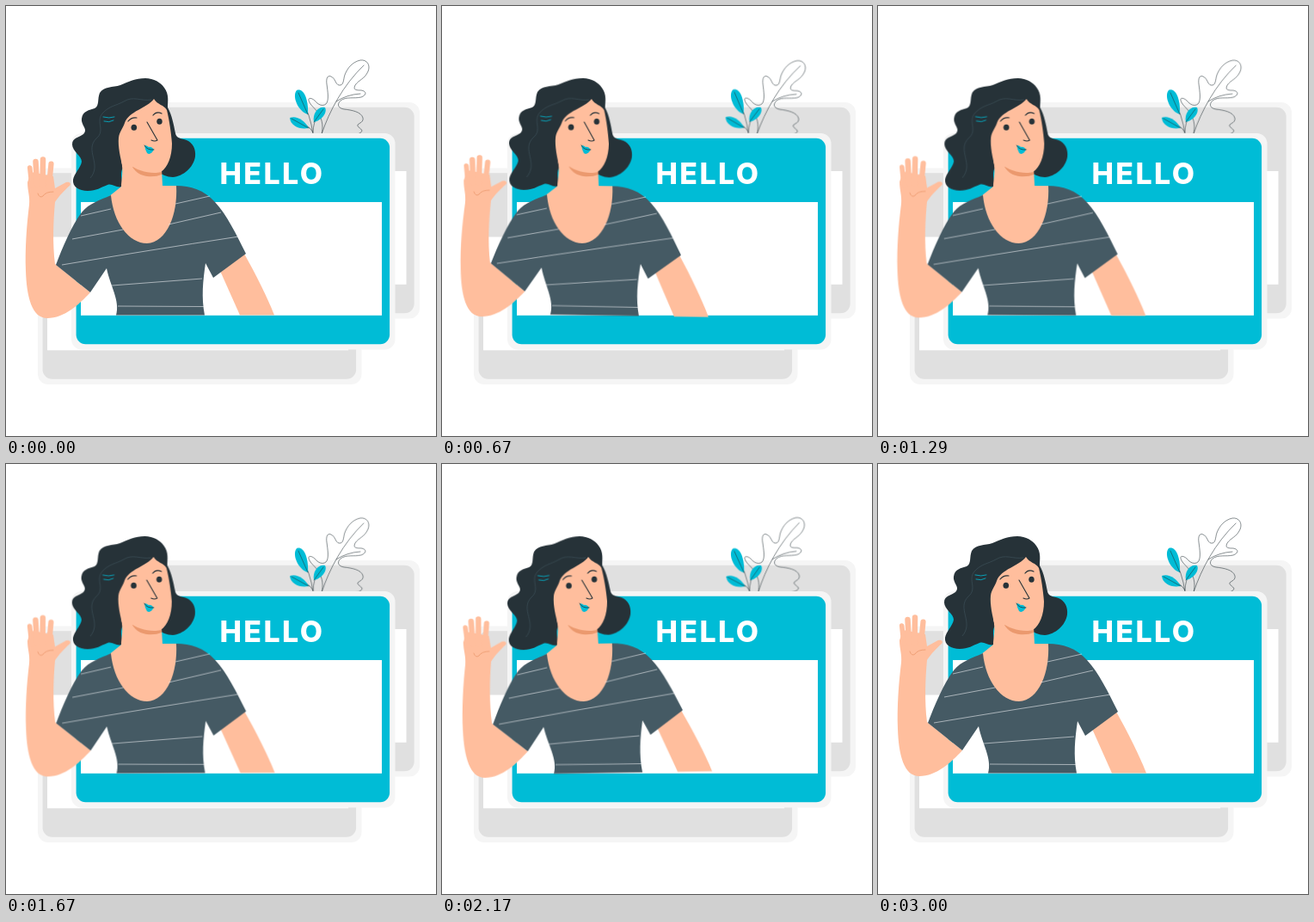
Write an HTML page that moves like this. It is 500 px wide and 500 px high and loops after 3040 ms.

```html
<!DOCTYPE html>
<html lang="en">
<head>
<meta charset="utf-8">
<title>Hello</title>
<style>
  html, body { margin: 0; width: 100%; height: 100%; overflow: hidden; background: #fff; }
  svg { display: block; width: 100%; height: 100%; }
  .sway { transform-box: view-box; animation: sway 3040ms linear infinite; }
  .person { transform-origin: 169px 224px; }
  .plant { transform-origin: 376px 106px; }
  /* a 3 s sway followed by a short rest */
  @keyframes sway {
    0%, 98.68%, 100% { transform: rotate(0deg); }
    24.67% { transform: rotate(1deg); }
    74.01% { transform: rotate(-1deg); }
  }
  .teal { fill: #00bcd6; }
  .grey { fill: #e0e0e0; }
  .rim { fill: #f5f5f5; }
  .paper { fill: #fff; }
  .dark { fill: #263238; }
  .skin { fill: #ffbe9d; }
  .shirt { fill: #455a64; }
  .line { fill: none; stroke: #263238; stroke-width: .8; stroke-linecap: round; stroke-linejoin: round; }
  .plant .line { stroke-width: .55; }
  .fingers { fill: none; stroke: #ffbe9d; stroke-linecap: round; }
  .stripes { fill: none; stroke: #eceff1; stroke-width: .6; }
  .strands { fill: none; stroke: #455a64; stroke-width: .5; }
  .title { font: 800 34px Inter, "Open Sans", sans-serif; letter-spacing: 2.4px; fill: #fff; }
</style>
</head>
<body>
<svg viewBox="0 0 500 500">
  <defs>
    <g id="card">
      <rect class="rim" x="76" y="148" width="376.5" height="251.5" rx="12"/>
      <rect x="81.6" y="153.700" width="364.500" height="239.500" rx="11"/>
      <rect class="paper" x="87" y="228" width="350" height="131.800"/>
    </g>
  </defs>

  <use href="#card" class="grey" x="28.5" y="-36"/>
  <use href="#card" class="grey" x="-39" y="40.5"/>

  <g class="sway plant">
    <path class="line" d="M367 149C369 141 368 133 364 126C360 119 354 116 352 110C351 106 356 107 359 110C363 115 368 117 372 114C376 110 374 99 373 91C372 84 374 80 378 82C383 84 383 91 387 92C393 93 392 86 394 80C397 72 403 65 412 63C420 62 424 69 421 76C417 85 410 86 406 92C403 98 408 98 413 98C420 99 419 104 413 106C404 108 396 105 389 110C384 115 387 119 393 120C402 121 413 123 415 130C416 135 411 136 409 138C408 141 413 142 414 145C413 149 405 150 398 150"/>
    <path class="line" d="M367 149C376 122 392 92 416 69M384 111Q396 103 412 102"/>
    <path class="line" d="M343 107Q354 126 357 149M363 126Q357 136 357 147M338 135Q352 137 357 147"/>
    <path class="teal" d="M338 98C345 95 352 106 351 126C340 123 332 105 338 98Z"/>
    <path class="teal" d="M358 135C356 125 363 116 371 118C374 124 367 133 358 135Z"/>
    <path class="teal" d="M330 130C337 127 347 132 352 142C342 144 331 140 330 130Z"/>
    <path class="line" d="M340 101L351 126M369 120L358 135M332 131L352 142"/>
  </g>

  <use href="#card" class="teal"/>
  <text class="title" x="248.5" y="207.3">HELLO</text>

  <g class="sway person">
    <!-- hair -->
    <path class="dark" d="M162 84C172 84 180 89 184 95C190 103 188 111 188 118C193 127 195 138 197 148C198 154 204 154 210 156C217 159 221 166 220 175C218 188 206 198 194 199C187 199 181 196 176 192L136 188C131 196 137 205 135 210C128 212 124 206 118 208C110 211 105 215 95 215C85 215 77 210 78 202C79 195 87 188 88 181C88 174 77 169 77 161C77 153 85 153 90 149C96 143 87 139 88 131C89 122 97 121 103 119C109 116 106 108 109 101C114 93 124 95 133 92C143 88 150 84 162 84Z"/>
    <path class="strands" d="M98 200C112 184 91 168 105 154C116 145 104 135 112 125C120 116 128 116 137 111C148 104 157 111 169 109"/>
    <path class="line" style="stroke:#00bcd6" d="M113 129Q120 131 126 129M114 134Q120 136 125 133"/>

    <!-- raised arm -->
    <path class="skin" d="M25 205C25 215 28 221 27 231C24 255 22 283 23 308C24 338 30 363 48 363C68 363 85 347 98 333L57 300C54 276 55 250 57 228C60 223 68 214 74 209C77 206 72 203 68 206L57 212L55 198L29 193Z"/>
    <g class="fingers">
      <path stroke-width="5.6" d="M27.7 188L30 209"/>
      <path stroke-width="6.5" d="M34.5 181L36 207"/>
      <path stroke-width="6.5" d="M43 178.500L42.500 207"/>
      <path stroke-width="6.2" d="M52.500 183.500L50 210"/>
    </g>
    <path class="line" style="stroke:#eb996e" d="M37 218Q39 224 43 221Q46 216 55 216"/>

    <!-- other arm, neck and face -->
    <path class="skin" d="M249 308L272 359.500H312C304 339 291 313 277 288Z"/>
    <path class="skin" d="M134 180C137 192 134 202 134 210L119 222C122 258 143 281 164 281C188 279 203 247 200 209L182 209L181 190Z"/>
    <path fill="#eb996e" d="M147 187C151 194 157 197 164 198Q174 199 181 196V190Z"/>
    <path class="skin" d="M172 108C176 115 184 115 187 121C190 133 192 148 193 160C193 175 188 188 180 193C170 196 152 192 144 184L136 188C133 177 130 163 131 153C132 146 136 142 138 136C143 122 164 119 172 108Z"/>
    <ellipse class="dark" cx="148.800" cy="141.300" rx="3.300" ry="3.500"/>
    <ellipse class="dark" cx="178.500" cy="134.300" rx="3.200" ry="3.500"/>
    <path class="line" style="stroke-width:1.200" d="M142 134Q146 129 152 130M171 127Q175 122 181 125"/>
    <path class="line" style="stroke-width:1.100" d="M164 135L176 156Q173 158 169 156"/>
    <path class="teal" d="M161 162Q164 162 166 164Q169 163 172 167Q168 174 164 171Q162 168 161 162Z"/>
    <path class="line" d="M161 162Q164 168 172 167"/>

    <!-- shirt -->
    <path class="shirt" d="M122 220C125 252 143 276 164 276C187 275 200 242 198 209C214 209 231 214 243 228C257 243 268 266 279 288L241 316L232 299C229 320 227 338 231 359.500H128C133 343 121 325 117 305L98 333L58 301C66 280 76 256 88 240C97 229 109 226 122 220Z"/>
    <path class="stripes" d="M87 244L122 236M197 230L237 221M77 271L136 260M189 254L250 240M65 301Q160 285 271 268M123 325L228 317M130 349L230 349.500"/>
  </g>
</svg>
</body>
</html>
```
